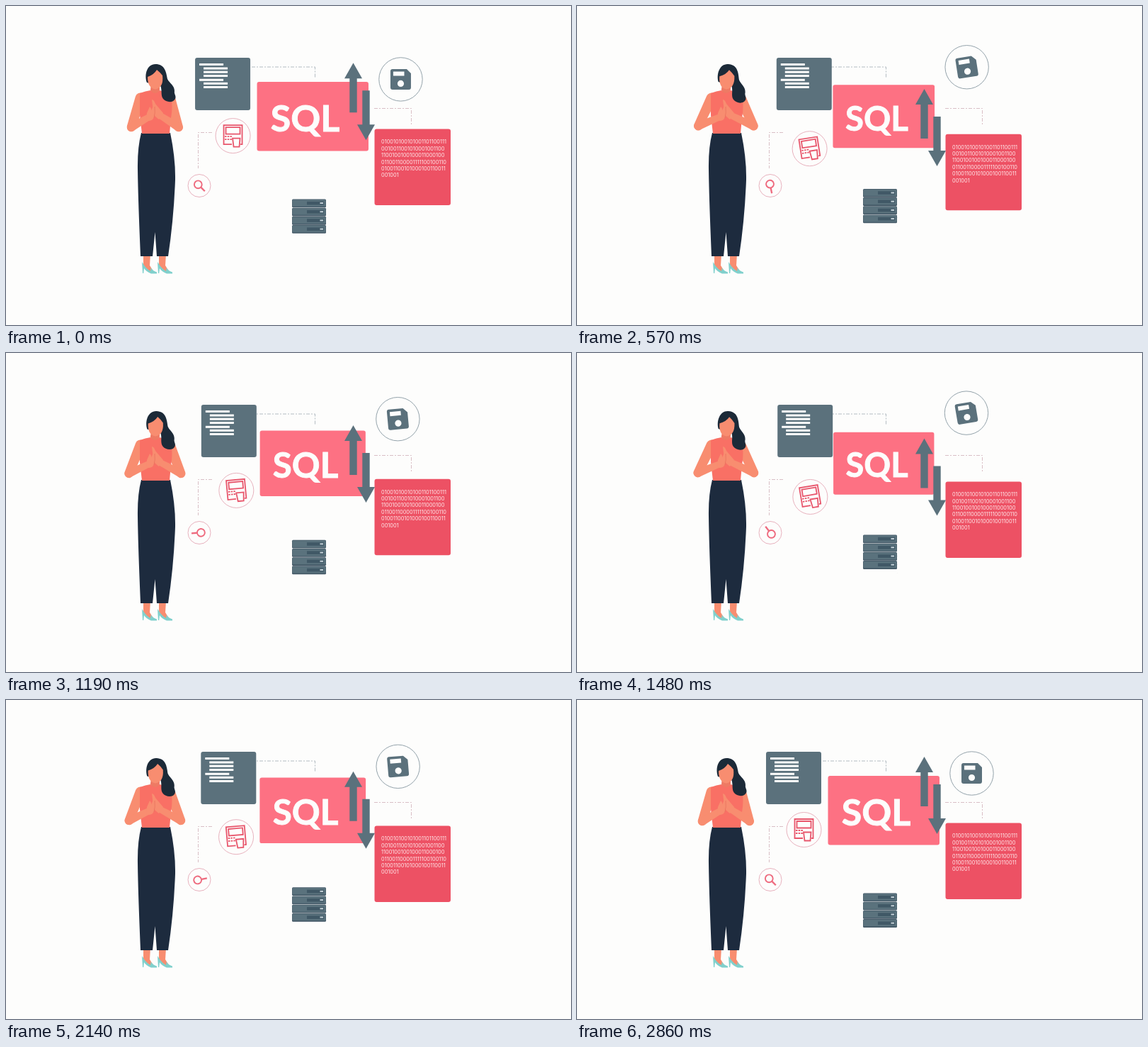
Animation of 798x450 px, one loop 2890 ms. Source, as an HTML page:

```html
<!DOCTYPE html>
<html lang="en">
<head>
<meta charset="utf-8">
<title>SQL illustration</title>
<style>
html, body { margin: 0; width: 100%; height: 100%; overflow: hidden; background: #fdfdfc; }
svg { display: block; width: 798px; height: 450px; }
.dash { fill: none; stroke: #d9bfc6; stroke-width: 1; stroke-dasharray: 5 2 2 2; }
.slate { fill: #5b717c; }
.ring { fill: #fdfdfc; stroke-width: 0.9; }
.icon { fill: none; stroke: #e8566c; stroke-width: 1.8; }
.skin { fill: #f88d70; }
.hair { fill: #1c2a38; }
.shoe { fill: #80d0cc; }
.title { font: 700 52px Lato, Inter, sans-serif; fill: #fdfdfc; stroke: #fdfdfc; text-anchor: middle; }
.bits { font: 400 7.4px Inter, Roboto, sans-serif; fill: #ffeaec; }
</style>
</head>
<body>
<svg viewBox="0 0 798 450">
  <path class="dash" d="M347 86H436.5V101" style="stroke:#b3bcc2"/>
  <path class="dash" d="M520 144.5H572.5V168"/>
  <path class="dash" d="M291 178.5H271.5V229"/>

  <g id="woman">
    <g class="skin">
      <path d="M194 350H204L203 366L209 375.500L204 376L194 367Z"/>
      <path d="M216 350H226L225 366L231 375.500L226 376L216 367Z"/>
    </g>
    <g id="shoes"></g>
    <path fill="#1d2b3e" d="M191 179H232Q239.500 215 239 245Q237 300 229 353H213L210.500 319L207 353H190Q186.500 270 186 230Q185.500 200 191 179Z"/>
    <path id="upperL" class="skin"/>
    <path id="upperR" class="skin"/>
    <path fill="#f97065" d="M189 123Q197 120 204 119Q211 124 217 119Q226 121 233 125Q236 142 233 158L231 180H192L189 154Z"/>
    <g id="head">
      <path class="hair" d="M211 82C224 82 226 92 228 103C231 109 238 112 238 120C237 124 241 127 239 131C236 137 226 136 222 131C218 126 221 119 218 112L199 108C195 97 199 82 211 82Z"/>
      <path fill="#ee7a64" d="M205 108H217V119Q211 127 204 119Z"/>
      <path class="skin" d="M200 100Q209 97 213 90Q217 93 221 98Q223 115 211 117.500Q200 116 200 100Z"/>
    </g>
    <path id="foreL" class="skin"/>
    <path id="foreR" class="skin"/>
    <path class="skin" d="M206 132Q209 132 211 138L222 151L216 160Q208 155 208 148Z"/>
    <path class="skin" d="M209 138Q212 140 210 146L209 157Q206 164 198 161L199 151L203 142Q206 145 205 148Q207 143 209 138Z"/>
    <path d="M210 142Q211 151 209 158" fill="none" stroke="#e8745f" stroke-width="0.8"/>
  </g>

  <g id="code">
    <rect class="slate" x="267" y="73" width="78" height="74" rx="3"/>
    <g id="lines" fill="#fdfdfc"></g>
  </g>

  <g id="sql">
    <rect x="354.500" y="107" width="157.500" height="97.500" rx="3" fill="#fd7183"/>
    <text class="title" x="422.500" y="177.500">SQL</text>
  </g>

  <g id="bitPanel">
    <rect x="520.500" y="173.500" width="107.500" height="107.500" rx="3" fill="#ed5164"/>
    <g id="bits" class="bits"></g>
  </g>

  <g id="arrows" class="slate">
    <path d="M490.500 80L503 102H495.700V150H485.300V102H478Z"/>
    <path d="M508.500 189L496 167H503.300V119H513.700V167H521Z"/>
  </g>

  <g id="disk">
    <circle class="ring" cx="557.500" cy="103.500" r="30.700" stroke="#8798a1"/>
    <g id="diskIcon">
      <path class="slate" d="M546 89H566L572 95V115Q572 118 569 118H546Q543 118 543 115V92Q543 89 546 89Z"/>
      <rect x="547" y="92.500" width="15.500" height="6" fill="#fdfdfc"/>
      <circle cx="557.500" cy="109.500" r="4.600" fill="#fdfdfc"/>
    </g>
  </g>

  <g id="device">
    <circle class="ring" cx="320.500" cy="183" r="24.500" stroke="#e5a9b6"/>
    <g id="deviceIcon" class="icon">
      <path d="M319 195H307.500V168H333.500V195H331"/>
      <rect x="310.500" y="171" width="20" height="9.500"/>
      <path d="M309 184H319M309 188H319" stroke-dasharray="2.500 1.200"/>
      <path d="M320 186.500H330.500L329.500 198.500H321.500Z"/>
    </g>
  </g>

  <circle class="ring" cx="273" cy="253.500" r="16" stroke="#e5a9b6"/>
  <g id="lens" fill="none" stroke="#ee6a7e">
    <circle cx="271.300" cy="251.800" r="5.400" stroke-width="1.900"/>
    <path d="M275.400 255.900L280.800 261.300" stroke-width="2.300"/>
  </g>

  <g id="server"></g>
</svg>
<script>
const LOOP = 2890, SWAY = 960, LEAD = 17;
const $ = id => document.getElementById(id);

function add(parent, tag, attrs, text) {
  const el = document.createElementNS("http://www.w3.org/2000/svg", tag);
  for (const key in attrs) el.setAttribute(key, attrs[key]);
  if (text) el.textContent = text;
  $(parent).append(el);
}

[82.5, 88, 93.2, 98.5, 104.3, 109.3, 114.5].forEach((y, i) =>
  add("lines", "rect", { x: i % 4 ? 279 : 273, y: y - 1.5, width: 34, height: 3 }));

["010010100101001101100111", "0010011001010001001100", "1100100100100011000100",
 "011001100001111100100110", "01001100101000100110011", "001001"].forEach((row, i) =>
  add("bits", "text", { x: 530, y: 194.3 + i * 9.4 }, row));

for (let i = 0; i < 4; i++) {
  const y = 272.5 + i * 12.2;
  add("server", "rect", { x: 404, y, width: 48, height: 11.8, rx: 1.5, fill: "#455a68" });
  add("server", "rect", { x: 404.5, y: y + 0.8, width: 47, height: 9.4, rx: 1, fill: "#5a727d" });
  add("server", "rect", { x: 425, y: y + 3.4, width: 24, height: 4.6, fill: "#405866" });
  add("server", "rect", { x: 443.5, y: y + 4.6, width: 4.5, height: 2, fill: "#c5d2d8" });
}

for (const x of [0, 22])
  add("shoes", "path", { class: "shoe", transform: `translate(${x})`,
    d: "M192 361L196 367Q200 372 204 374Q205 371 204 369Q208 374 213 375.500V377.500H205Q198 375 195 370L194.200 377H193Z" });

// Tapered limb with round ends
function limb(a, b, ra, rb) {
  const [dx, dy] = [b[0] - a[0], b[1] - a[1]], len = Math.hypot(dx, dy);
  const at = (c, r) => `${c[0] - dy / len * r} ${c[1] + dx / len * r}`;
  return `M${at(a, ra)}A${ra} ${ra} 0 0 1 ${at(a, -ra)}` +
         `L${at(b, -rb)}A${rb} ${rb} 0 0 1 ${at(b, rb)}Z`;
}

function arm(side, shoulder, elbow, wrist) {
  $("upper" + side).setAttribute("d", limb(shoulder, elbow, 7.5, 6.3));
  $("fore" + side).setAttribute("d", limb(elbow, wrist, 6, 4.3));
}

const place = (id, value) => $(id).setAttribute("transform", value);

function draw(t) {
  const p = (1 - Math.cos(2 * Math.PI * (t + LEAD) / SWAY)) / 2;
  const turn = 180 * (1 - Math.cos(Math.PI * t / LOOP));
  const tilt = -10 * p;

  place("code", `translate(${16.8 * p})`);
  place("sql", `translate(433.2 155.8) scale(${1 - 0.1 * p}) translate(-433.2 -155.8)`);
  place("bitPanel", `translate(0 ${8.2 * p})`);
  place("arrows", `translate(0 ${42 * p})`);
  place("disk", `translate(${-7.8 * p} ${-19.6 * p})`);
  place("diskIcon", `rotate(${tilt} 557.5 103.5)`);
  place("device", `translate(${9.2 * p} ${20.7 * p})`);
  place("deviceIcon", `rotate(${tilt} 320.5 183)`);
  place("lens", `rotate(${turn} 273 253.5)`);
  place("server", `translate(0 ${-16.6 * p})`);
  place("head", `rotate(${5 * p} 211 116)`);
  arm("L", [190, 130], [177 - 6.5 * p, 171 - 2 * p], [203, 156]);
  arm("R", [232, 132], [243.7 + 6.5 * p, 171 - 2 * p], [217, 154]);
}

const start = performance.now();
function tick() {
  draw((performance.now() - start) % LOOP);
  requestAnimationFrame(tick);
}
tick();
</script>
</body>
</html>
```
